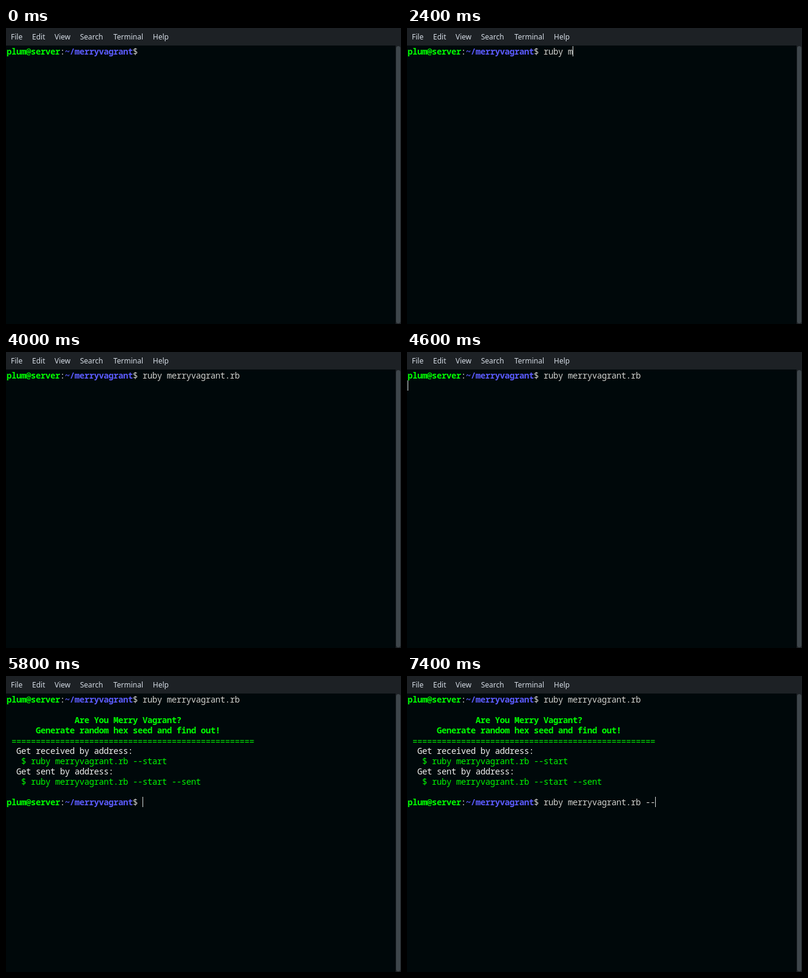
Write an HTML page that moves like this. It is 651x490 px and loops after 8000 ms.

```html
<!DOCTYPE html>
<html lang="en">
<head>
<meta charset="utf-8">
<title>Terminal</title>
<style>
  html, body { margin: 0; width: 100%; height: 100%; overflow: hidden; background: #00080a; }
  #stage { position: relative; width: 651px; height: 490px; overflow: hidden; background: #00080a; }
  #menu {
    position: absolute; inset: 0 0 auto; height: 29px; background: #1d2125;
    color: #d3dae3; font: 12px/29px "Noto Sans", sans-serif;
  }
  #menu span { position: absolute; top: 0; }
  #term {
    position: absolute; left: 1px; top: 30px; color: #d0d0cc; white-space: pre;
    font: 14px/17px "Noto Sans Mono", monospace; letter-spacing: calc(8px - 0.6em);
    font-variant-ligatures: none;
  }
  #term div { height: 17px; }
  b { font-weight: 700; }
  .user { color: #00ff00; }
  .path { color: #5c5cff; }
  .green { color: #00f400; }
  .rule { color: #00f400; position: relative; top: 1px; }
  .white { color: #f0f0ee; }
  #cursor { position: absolute; width: 1px; height: 17px; background: #d4d8d8; }
  #track { position: absolute; left: 642px; top: 29px; width: 9px; height: 461px; background: #1d2125; }
  #thumb { position: absolute; left: 1px; top: 1px; width: 7px; height: 459px; border-radius: 4px; background: #3e464b; }
</style>
</head>
<body>
<div id="stage">
  <div id="menu"></div>
  <div id="term"></div>
  <div id="cursor"></div>
  <div id="track"><div id="thumb"></div></div>
</div>
<script>
const LOOP = 8000, CELL = 8, ROW = 17;
const USER = "plum@server", DIR = "merryvagrant";
const CMD = `ruby ${DIR}.rb`;
const PROMPT_COLS = `${USER}:~/${DIR}$ `.length;
const LAST_ROW = 10;

const $ = id => document.getElementById(id);
const menuItems = { File: 8, Edit: 43, View: 80, Search: 122, Terminal: 177, Help: 242 };
$("menu").innerHTML = Object.entries(menuItems)
  .map(([name, x]) => `<span style="left:${x}px">${name}</span>`).join("");

const line = html => `<div>${html}</div>`;
const paint = (cls, col, text, tag = "span") =>
  line(" ".repeat(col) + `<${tag} class="${cls}">${text}</${tag}>`);
const prompt = text =>
  line(`<b class="user">${USER}</b>:<b class="path">~/${DIR}</b>$ ${text}`);

const output = [
  line(""),
  paint("user", 14, "Are You Merry Vagrant?", "b"),
  paint("user", 6, "Generate random hex seed and find out!", "b"),
  paint("rule", 1, "=".repeat(50)),
  paint("white", 2, "Get received by address:"),
  paint("green", 3, `$ ${CMD} --start`),
  paint("white", 2, "Get sent by address:"),
  paint("green", 3, `$ ${CMD} --start --sent`),
  line("")
].join("");

// [time, phase, typed text, cursor visible]
const steps = [
  [0, "first", "", false],
  [600, "first", "", true],
  [1400, "first", "ru", true],
  [1800, "first", "ruby", true],
  [2200, "first", "ruby ", true],
  [2400, "first", CMD.slice(0, 6), true],
  [2800, "first", CMD.slice(0, 7), true],
  [3000, "first", CMD.slice(0, 8), true],
  [3200, "first", CMD.slice(0, 9), true],
  [3400, "first", CMD + " ", true],
  [4000, "first", CMD + " ", false],
  [4600, "wait", "", true],
  [5000, "second", "", true],
  [5200, "second", "", false],
  [5800, "second", "", true],
  [6000, "second", CMD, true],
  [6600, "second", CMD, false],
  [6800, "second", CMD + " ", true],
  [7000, "second", CMD + " -", true],
  [7400, "second", CMD + " --", true]
];

function show([, phase, text, on]) {
  $("term").innerHTML = phase === "first" ? prompt(text)
    : prompt(CMD) + (phase === "second" ? output + prompt(text) : "");
  const row = { first: 0, wait: 1, second: LAST_ROW }[phase];
  const col = phase === "wait" ? 0 : PROMPT_COLS + text.length;
  const cursor = $("cursor").style;
  cursor.left = 1 + col * CELL + "px";
  cursor.top = 30 + row * ROW + "px";
  cursor.visibility = on ? "visible" : "hidden";
}

let current;
const start = performance.now();
function tick() {
  const t = (performance.now() - start) % LOOP;
  const step = steps.findLast(s => s[0] <= t);
  if (step !== current) show(current = step);
  requestAnimationFrame(tick);
}
tick();
</script>
</body>
</html>
```
